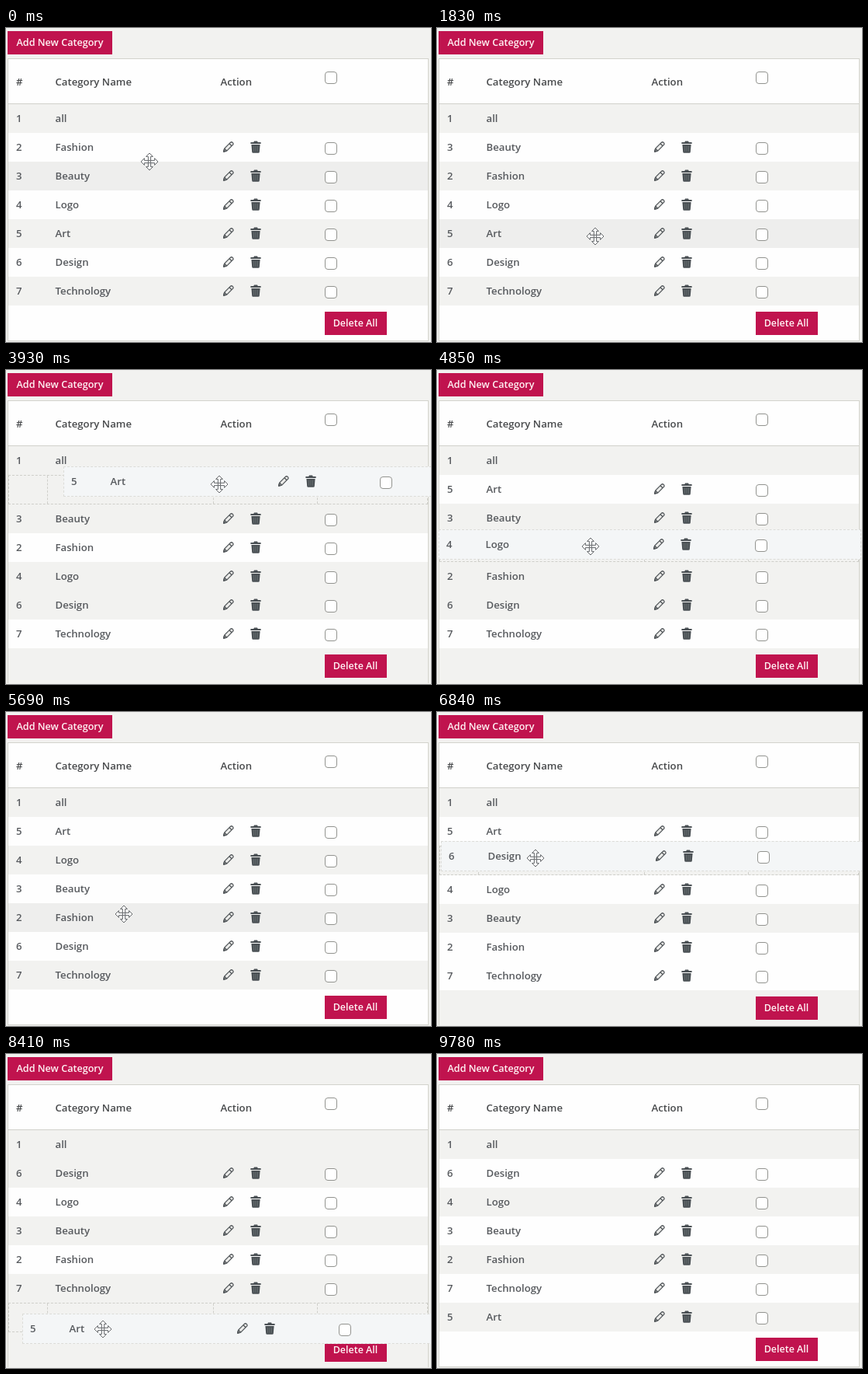
An HTML page that plays this animation: 548 by 404 pixels, repeating every 9.86 s.

```html
<!DOCTYPE html>
<html lang="en">
<head>
<meta charset="utf-8">
<title>Sortable categories</title>
<style>
  html, body { margin: 0; width: 100%; height: 100%; overflow: hidden; background: #f2f2f0; }
  #stage { position: absolute; left: 0; top: 0; width: 548px; height: 404px; overflow: hidden;
    font: 600 13.2px "Open Sans", "Noto Sans", sans-serif; color: #575a5e; white-space: nowrap; }
  #stage * { position: absolute; box-sizing: border-box; }
  .table { left: 2px; top: 39px; width: 543px; height: 364px; border: 1px solid #d3d3cc; background: #fefefe; }
  .head { left: 2px; top: 40px; width: 542px; height: 58px; border-bottom: 1px solid #d0d0cb; line-height: 58px; color: #484a4c; }
  .row { left: 3px; width: 541px; height: 37px; line-height: 37px; }
  .row.held { height: 39px; line-height: 39px; width: 545px; z-index: 3; background: #f4f6f7; outline: 1px dashed #dcdcd8; outline-offset: -1px; }
  .num { left: 10px; }
  .name { left: 60.5px; }
  .check { left: 407.5px; width: 16px; height: 16px; border: 1.3px solid #92938f; border-radius: 4px; background: #fff; }
  .row .check { top: 12px; }
  .pencil { left: 276px; top: 10px; }
  .trash { left: 312px; top: 10px; }
  .held svg, .row.held .check { margin-top: 1px; }
  .button { background: #c0134e; color: #fff3f4; text-align: center; }
  .add { left: 2px; top: 4px; width: 135px; height: 30px; line-height: 30px; font-size: 12.6px; }
  .delete { left: 407.5px; top: 7.5px; width: 80px; height: 30px; line-height: 30px; font-size: 12.5px; }
  #gap { left: 3px; width: 541px; height: 38px; background: #f2f2f0; border: 1px dashed #cfcfca; }
  #gap i { top: 0; height: 36px; border-left: 1px dashed #cfcfca; }
  #foot { left: 3px; width: 541px; height: 45px; }
  #cursor { left: -12px; top: -12px; z-index: 5; }
</style>
</head>
<body>
<div id="stage">
  <div class="button add">Add New Category</div>
  <div class="table"></div>
  <div class="head">
    <span style="left:11px">#</span><span style="left:61.5px">Category Name</span>
    <span style="left:274.5px">Action</span><b class="check" style="left:408.5px;top:16px"></b>
  </div>
  <div id="foot"><div class="button delete">Delete All</div></div>
  <div id="gap"><i style="left:49px"></i><i style="left:263px"></i><i style="left:397px"></i></div>
  <svg id="cursor" width="24" height="24" viewBox="-12 -12 24 24" fill="#fff" stroke="#55585c" stroke-width=".9" stroke-linejoin="round"></svg>
</div>
<script>
const LOOP = 9860, TOP = 98, ROW = 37, LAST = 6;
const STRIPE = '#f2f2f0', PLAIN = '#fefefe', HOVER = '#eeeeed';
const NAMES = ['all', 'Fashion', 'Beauty', 'Logo', 'Art', 'Design', 'Technology'];
const ENTRY = [185, 172], EXIT = [118, 420], EXIT_TIME = [8860, 9130];

// Each drag: the pointer travels to "grab", drags to "end", then lets go at "drop".
const DRAGS = [
  { name: 'Fashion', slot: 2, travel: [40, 300], drag: [610, 990], drop: 1030, grab: [188, 157], end: [190, 191] },
  { name: 'Art', slot: 1, travel: [1220, 1530], drag: [2250, 3930], drop: 4010, grab: [204, 268], end: [275, 147] },
  { name: 'Logo', slot: 2, travel: [4200, 4600], drag: [4650, 5340], drop: 5400, grab: [199, 267], end: [196, 187] },
  { name: 'Design', slot: 2, travel: [5430, 6110], drag: [6300, 6840], drop: 6990, grab: [125, 304], end: [127, 188] },
  { name: 'Art', slot: LAST, travel: [7300, 7530], drag: [7760, 8560], drop: 8710, grab: [107, 154], end: [126, 361] }
];

const $ = id => document.getElementById(id);
const stage = $('stage'), gap = $('gap'), foot = $('foot'), cursor = $('cursor');

cursor.innerHTML = [0, 90, 180, 270].map(angle =>
  `<path transform="rotate(${angle})" d="M-1.6 -1.6V-6.6H-4.4L0 -11L4.4 -6.6H1.6V-1.6"/>`
).join('') + '<path d="M-1.6 -1.6H1.6V1.6H-1.6Z"/>';

const ICONS = `
  <svg class="pencil" width="16" height="16" viewBox="0 0 16 16" fill="none" stroke="#52575a" stroke-width="1.3" stroke-linejoin="round">
    <path fill="#ececea" d="M1.6 14.2L2.6 10.1L10.3 2.4Q11.8 1 13.2 2.4Q14.8 4 13.4 5.4L5.7 13.1Z"/>
    <path d="M9 3.8L12 6.8M2.8 10.2L5.6 13"/><path fill="#52575a" d="M1.6 14.2L2.1 12L3.8 13.7Z"/></svg>
  <svg class="trash" width="14" height="16" viewBox="0 0 14 16" fill="#4a5054">
    <path d="M.4 2H4.2L5 .4H9L9.8 2H13.6V4H.4ZM1.4 5H12.6L11.8 14.4Q11.7 15.8 10.4 15.8H3.6Q2.3 15.8 2.2 14.4Z"/>
    <path d="M4.6 6.8V13.8M7 6.8V13.8M9.4 6.8V13.8" stroke="#70767a" stroke-width=".8"/></svg>
  <b class="check"></b>`;

const rows = {};
NAMES.forEach((name, i) => {
  const row = rows[name] = document.createElement('div');
  row.className = 'row';
  row.innerHTML = `<span class="num">${i + 1}</span><span class="name">${name}</span>${i ? ICONS : ''}`;
  stage.insertBefore(row, cursor);
});

function glide(a, b, [t0, t1], t) {
  const u = Math.min(1, Math.max(0, (t - t0) / (t1 - t0)));
  const eased = 1 - (1 - u) ** 2;
  return a.map((v, i) => v + (b[i] - v) * eased);
}

function pointer(t) {
  let from = ENTRY;
  for (const { travel, drag, grab, end } of DRAGS) {
    if (t < drag[0]) return glide(from, grab, travel, t);
    if (t < drag[1]) return glide(grab, end, drag, t);
    from = end;
  }
  return glide(from, EXIT, EXIT_TIME, t);
}

const stripe = n => n % 2 ? PLAIN : STRIPE;

function place(el, y, color) {
  el.style.transform = `translateY(${y}px)`;
  el.style.background = color;
}

function render(t) {
  const [x, y] = pointer(t);
  const order = [...NAMES];
  let active = null;
  for (const d of DRAGS) {
    if (t >= d.drop) {
      order.splice(order.indexOf(d.name), 1);
      order.splice(d.slot, 0, d.name);
    } else if (t >= d.drag[0]) active = d;
  }

  let from = -1, hole = Infinity, dx = 0, dy = 0;
  if (active) {
    dx = Math.round(x - active.grab[0]);
    dy = Math.round(y - active.grab[1]);
    from = order.indexOf(active.name);
    hole = Math.min(LAST, Math.max(1, from + Math.round(dy / ROW)));
  }
  const hover = active ? -1 : Math.floor((y - TOP) / ROW);

  order.forEach((name, k) => {
    const row = rows[name], held = k === from;
    row.classList.toggle('held', held);
    if (held) {
      row.style.background = '';
      row.style.transform = `translate(${dx}px, ${TOP + ROW * k + dy - 1}px)`;
      return;
    }
    // The held row keeps its place in the striping.
    const after = active && k > from ? 1 : 0;
    let slot = k - after;
    if (slot >= hole) slot++;
    place(row, TOP + ROW * slot + (slot > hole ? 1 : 0), slot === hover ? HOVER : stripe(slot + after));
  });

  gap.style.display = active ? '' : 'none';
  if (active) gap.style.transform = `translateY(${TOP + ROW * hole}px)`;
  const extra = active ? 1 : 0;
  place(foot, TOP + ROW * NAMES.length + extra, stripe(NAMES.length + extra));
  cursor.style.transform = `translate(${Math.round(x)}px, ${Math.round(y)}px)`;
}

const start = performance.now();
function tick() {
  render((performance.now() - start) % LOOP);
  requestAnimationFrame(tick);
}
tick();
</script>
</body>
</html>
```
